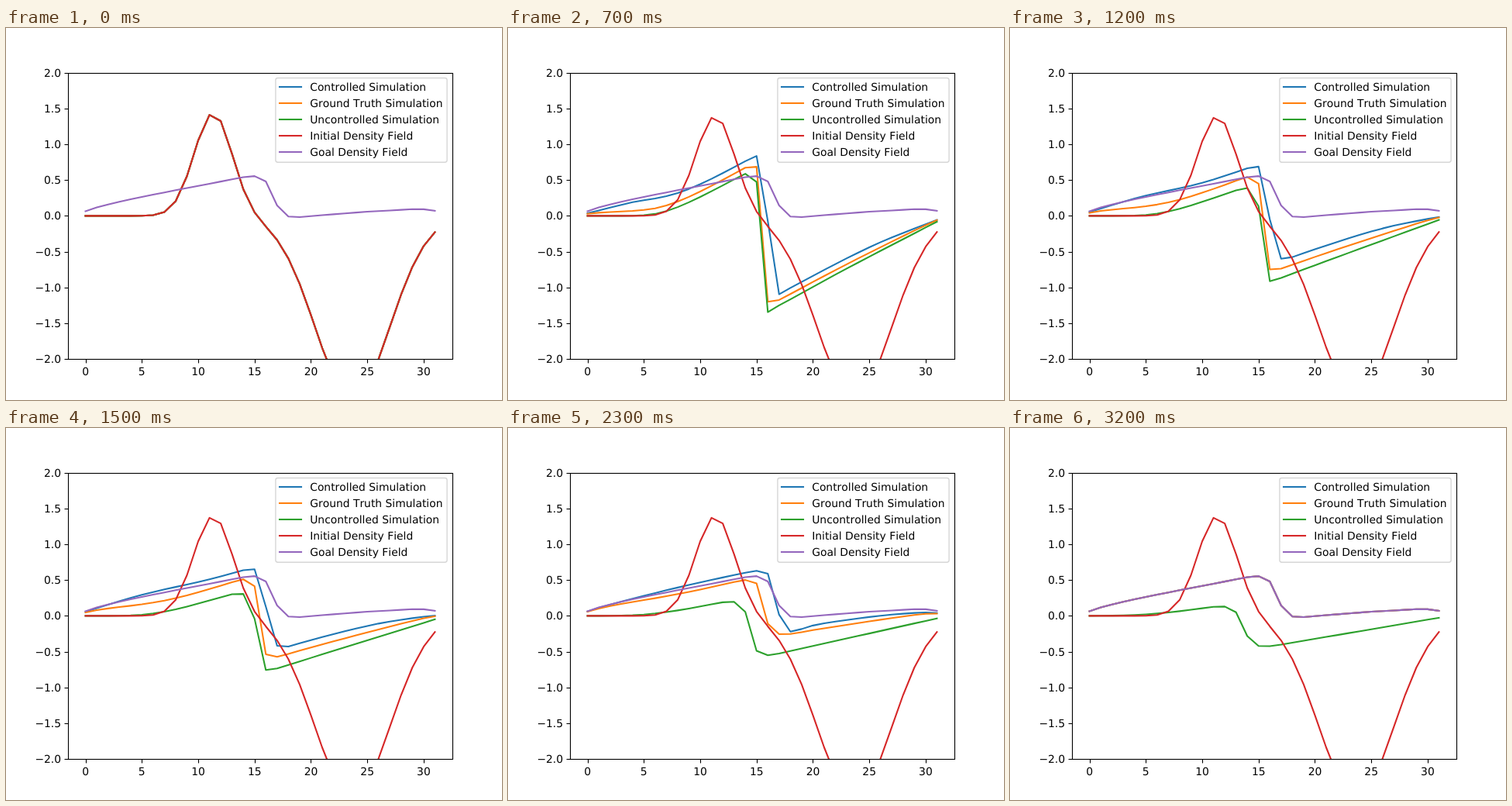
These frames come from a looping animation (640 px wide and 480 px high, 3.3 s). An HTML page with a canvas:

```html
<!DOCTYPE html>
<html lang="en">
<head>
<meta charset="utf-8">
<title>Density fields</title>
<style>
  html, body { margin: 0; width: 100%; height: 100%; overflow: hidden; background: #fff; }
  canvas, svg { position: absolute; left: 0; top: 0; width: 640px; height: 480px; }
  text {
    font: 13.89px "DejaVu Sans", sans-serif;
    font-kerning: none;
    fill: #000;
    text-rendering: geometricPrecision;
  }
</style>
</head>
<body>
<canvas id="plot" width="640" height="480"></canvas>
<svg id="labels" width="640" height="480" viewBox="0 0 640 480"></svg>
<script>
const CELLS = 32, LAST = 32, STEP_MS = 100, DT = 0.03, VISCOSITY = 0.003;
const cells = Array.from({ length: CELLS }, (_, i) => i);
const BOX = { left: 80, right: 576, top: 57.6, bottom: 427.2 };
const px = x => 102.545 + x * 14.5455;
const py = v => 242.4 - v * 92.4;

const bell = (amp, mid, variance) => x => amp * Math.exp(-((x - mid) ** 2) / (2 * variance));
const left = bell(1.4395, 11.33, 2.84);
const right = bell(-2.548, 23.68, 11.1);
const start = cells.map(x => left(x) + right(x));

// Burgers equation on a unit interval, zero outside
const at = (v, i) => v[i] ?? 0;

function diffuse(v) {
  const a = VISCOSITY * DT * CELLS * CELLS;
  return v.map((c, i) => c + a * (at(v, i - 1) + at(v, i + 1) - 2 * c));
}

function advect(v) {
  return v.map((c, i) => {
    const x = i - c * DT * CELLS, k = Math.floor(x), f = x - k;
    return at(v, k) * (1 - f) + at(v, k + 1) * f;
  });
}

function simulate(push) {
  const run = [start];
  for (let n = 0; n < LAST; n++) {
    run.push(advect(diffuse(run[n].map((c, i) => c + push(i, n) * DT))));
  }
  return run;
}

function lerp(points, x) {
  const j = Math.max(1, points.findIndex(p => p[0] >= x));
  const [x0, y0] = points[j - 1], [x1, y1] = points[j];
  return y0 + (y1 - y0) * (x - x0) / (x1 - x0);
}

// Rising ramp, then a drop and a shallow hump
const ramp = x => 0.117 + 0.0302 * x - 0.052 * Math.exp(-x / 1.85);
const tail = [[15, 0.555], [16, 0.48], [17, 0.145], [18, -0.01], [19, -0.018],
  [21, 0.01], [25, 0.058], [29, 0.093], [30, 0.092], [31, 0.07]];
const goal = cells.map(x => x < 15 ? ramp(x) : lerp(tail, x));

// Eases a run onto the goal at the last step
function settle(run, power) {
  const end = run[LAST];
  return run.map((v, n) => v.map((c, i) => c + (goal[i] - end[i]) * (n / LAST) ** power));
}

const force = bell(0.7, 16.6, 105);
const taper = x => Math.min(1, x / 4, (31 - x) / 4);
const control = (x, n) => 0.9 * taper(x) * Math.max(0, 1 - n / 16);

const free = simulate(() => 0);
const truth = settle(simulate(force), 2);
const controlled = settle(simulate((x, n) => force(x) + control(x, n)), 6);
const smoothed = diffuse(start);

const series = [
  { name: "Controlled Simulation", color: "#1f77b4", values: n => controlled[n] },
  { name: "Ground Truth Simulation", color: "#ff7f0e", values: n => truth[n] },
  { name: "Uncontrolled Simulation", color: "#2ca02c", values: n => free[n] },
  { name: "Initial Density Field", color: "#d62728", values: n => n ? smoothed : start },
  { name: "Goal Density Field", color: "#9467bd", values: () => goal }
];
const xTicks = Array.from({ length: 7 }, (_, i) => i * 5);
const yTicks = Array.from({ length: 9 }, (_, i) => i / 2 - 2);
const rowY = i => 76 + 21 * i;

const ctx = document.getElementById("plot").getContext("2d");
const svg = document.getElementById("labels");

function label(str, x, y, anchor) {
  const el = document.createElementNS("http://www.w3.org/2000/svg", "text");
  el.setAttribute("x", x);
  el.setAttribute("y", y);
  el.setAttribute("text-anchor", anchor);
  el.textContent = str;
  svg.append(el);
}

xTicks.forEach(x => label(String(x), px(x), 448, "middle"));
yTicks.forEach(v => label(v.toFixed(1).replace("-", "\u2212"), 71.1, Math.round(py(v) + 5), "end"));
series.forEach((s, i) => label(s.name, 392.2, rowY(i) + 5, "start"));

function line(points, color, width) {
  ctx.strokeStyle = color;
  ctx.lineWidth = width;
  ctx.beginPath();
  points.forEach(([x, y]) => ctx.lineTo(x, y));
  ctx.stroke();
}

const snap = v => Math.round(v) + 0.5;

function drawAxes() {
  const l = snap(BOX.left), r = snap(BOX.right), t = snap(BOX.top), b = snap(BOX.bottom);
  ctx.lineCap = "butt";
  xTicks.forEach(x => line([[snap(px(x)), b], [snap(px(x)), b + 5]], "#000", 1.11));
  yTicks.forEach(v => line([[l, snap(py(v))], [l - 5, snap(py(v))]], "#000", 1.11));
  ctx.strokeRect(l, t, r - l, b - t);
}

function drawLegend() {
  ctx.beginPath();
  ctx.roundRect(347.9, 64.5, 221.2, 108.7, 2.8);
  ctx.fillStyle = "rgba(255,255,255,0.8)";
  ctx.fill();
  ctx.strokeStyle = "rgba(204,204,204,0.8)";
  ctx.lineWidth = 1.39;
  ctx.stroke();
  ctx.lineCap = "square";
  series.forEach((s, i) => line([[353, rowY(i)], [381, rowY(i)]], s.color, 2.08));
}

function draw(n) {
  ctx.fillStyle = "#fff";
  ctx.fillRect(0, 0, 640, 480);
  ctx.save();
  ctx.beginPath();
  ctx.rect(BOX.left, BOX.top, BOX.right - BOX.left, BOX.bottom - BOX.top);
  ctx.clip();
  ctx.lineJoin = "round";
  ctx.lineCap = "square";
  series.forEach(s => line(s.values(n).map((v, i) => [px(i), py(v)]), s.color, 2.08));
  ctx.restore();
  drawAxes();
  drawLegend();
}

const begin = performance.now();
function tick() {
  const t = performance.now() - begin;
  draw(Math.floor(t / STEP_MS) % (LAST + 1));
  requestAnimationFrame(tick);
}
tick();
</script>
</body>
</html>
```
